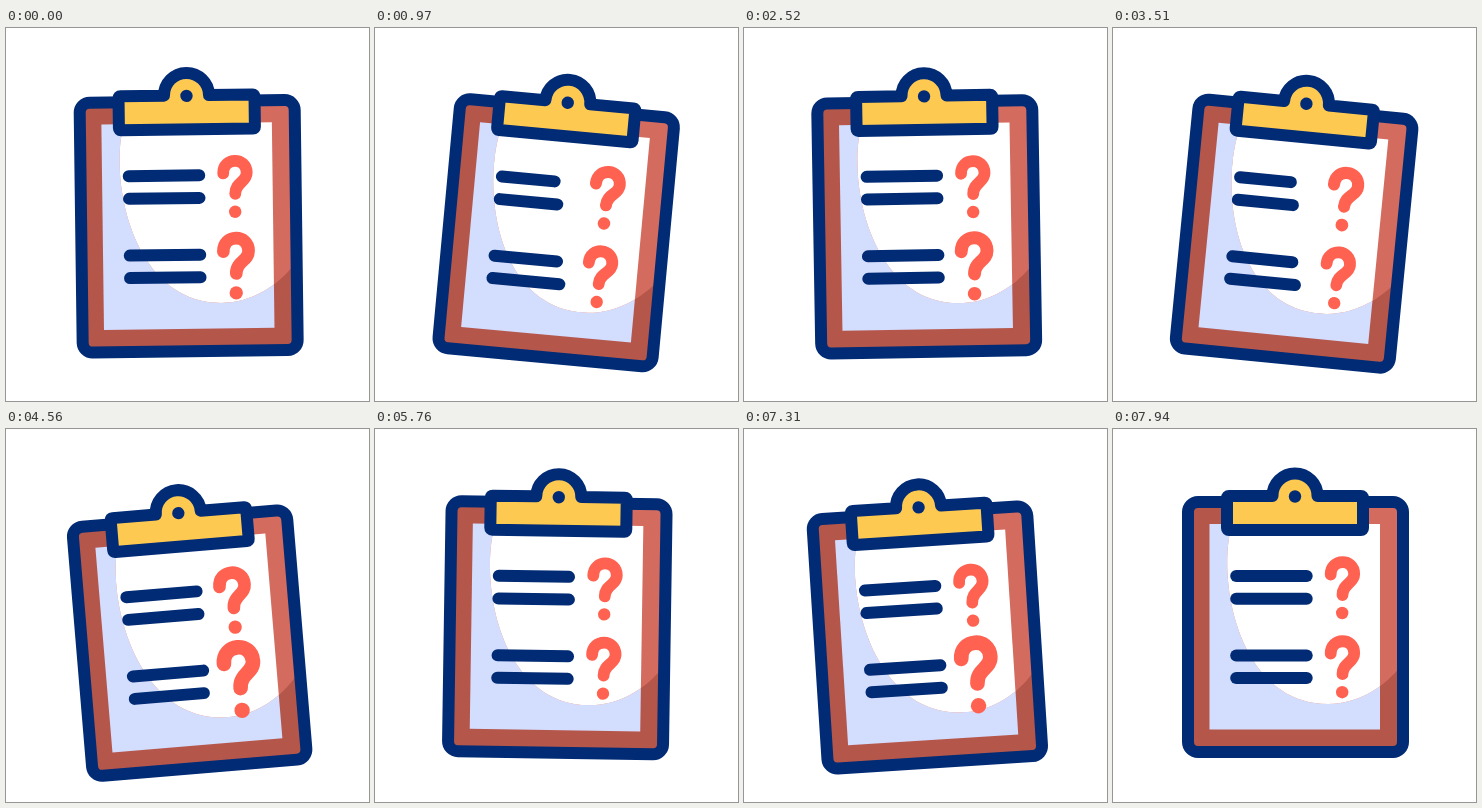
These frames come from a looping animation (363x373 px, 8000 ms). An HTML page:

```html
<!DOCTYPE html>
<html lang="en">
<head>
<meta charset="utf-8">
<title>Clipboard with questions</title>
<style>
  html, body { margin: 0; width: 100%; height: 100%; overflow: hidden; background: #fff; }
  svg { display: block; width: 100%; height: 100%; }
  .outline { stroke: #022b75; stroke-width: 12; stroke-linejoin: round; }
  .line { stroke: #022b75; stroke-width: 12; stroke-linecap: round; }
  .hook { fill: none; stroke: #ff6251; stroke-width: 11.8; stroke-linecap: round; }
  .dot { fill: #ff6251; }
</style>
</head>
<body>
<svg viewBox="0 0 363 373" xmlns="http://www.w3.org/2000/svg">
  <defs>
    <clipPath id="light">
      <path d="M119 95C103 150 125 275 215 275C245 275 270 258 284.5 241L300 60H119Z"/>
    </clipPath>
    <g id="question">
      <path class="hook" d="M-11.5 -13C-11.5 -29.5 12 -29.5 12 -13.5C12 -4 .3 -4 .3 7.5"/>
      <circle class="dot" cy="25.5" r="6.2"/>
    </g>
  </defs>
  <g id="board">
    <rect x="75" y="73" width="215" height="250" rx="10" fill="#b5564b"/>
    <rect x="96.5" y="95" width="170.5" height="205.5" fill="#d3ddfe"/>
    <g clip-path="url(#light)">
      <rect x="75" y="73" width="215" height="250" fill="#d46b5f"/>
      <rect x="96.5" y="95" width="170.5" height="205.5" fill="#fff"/>
    </g>
    <rect class="outline" x="75" y="73" width="215" height="250" rx="10" fill="none"/>
    <path class="outline" fill="#fec951" d="M116 67H159.5A22.5 22.5 0 0 1 204.5 67H248Q250 67 250 69V99Q250 101 248 101H116Q114 101 114 99V69Q114 67 116 67Z"/>
    <circle cx="182" cy="67.5" r="6.2" fill="#022b75"/>
    <line class="line" x1="123.2" y1="147" x2="193.7" y2="147"/>
    <line class="line" x1="123.2" y1="169.7" x2="193.7" y2="169.7"/>
    <line class="line" x1="123.2" y1="226.5" x2="193.7" y2="226.5"/>
    <line class="line" x1="123.2" y1="249" x2="193.7" y2="249"/>
    <use class="question" href="#question"/>
    <use class="question" href="#question"/>
  </g>
</svg>
<script>
  const LOOP = 8000, SWAY = 2567, STEP = 70.27, REST = 300;
  const board = document.getElementById("board");
  const lines = document.querySelectorAll(".line");
  const questions = document.querySelectorAll(".question");

  // Smooth 0 to 1 between two times
  const ease = (t, from, to) => {
    const p = Math.min(1, Math.max(0, (t - from) / (to - from)));
    return p * p * (3 - 2 * p);
  };

  function pose(time) {
    const t = (time - REST + SWAY) % SWAY + REST;
    const angle = 5.9 * ease(t, 505, 1015) - 11.2 * ease(t, 1280, 1805) + 5.3 * ease(t, 1805, 2800);
    const drop = 21 * (ease(t, 515, 1565) - ease(t, 1715, 2640));
    board.setAttribute("transform", `translate(0 ${drop}) rotate(${angle} 182 184)`);

    lines.forEach((line, i) => {
      const u = t - 68 * i;
      const shrink = ease(u, 600, 1050) - ease(u, 1340, 1870);
      line.setAttribute("x2", 193.7 - 22.5 * shrink);
    });

    questions.forEach((mark, i) => {
      const u = t - 570 * i;
      const scale = 1 + 0.24 * (ease(u, 830, 1380) - ease(u, 1650, 2200));
      mark.setAttribute("transform", `translate(229.2 ${158.5 + 79.2 * i}) scale(${scale})`);
    });
  }

  const start = performance.now();
  function frame() {
    const elapsed = (performance.now() - start) % LOOP;
    pose(Math.floor((elapsed + 12) / STEP) * STEP % LOOP);
    requestAnimationFrame(frame);
  }
  frame();
</script>
</body>
</html>
```
